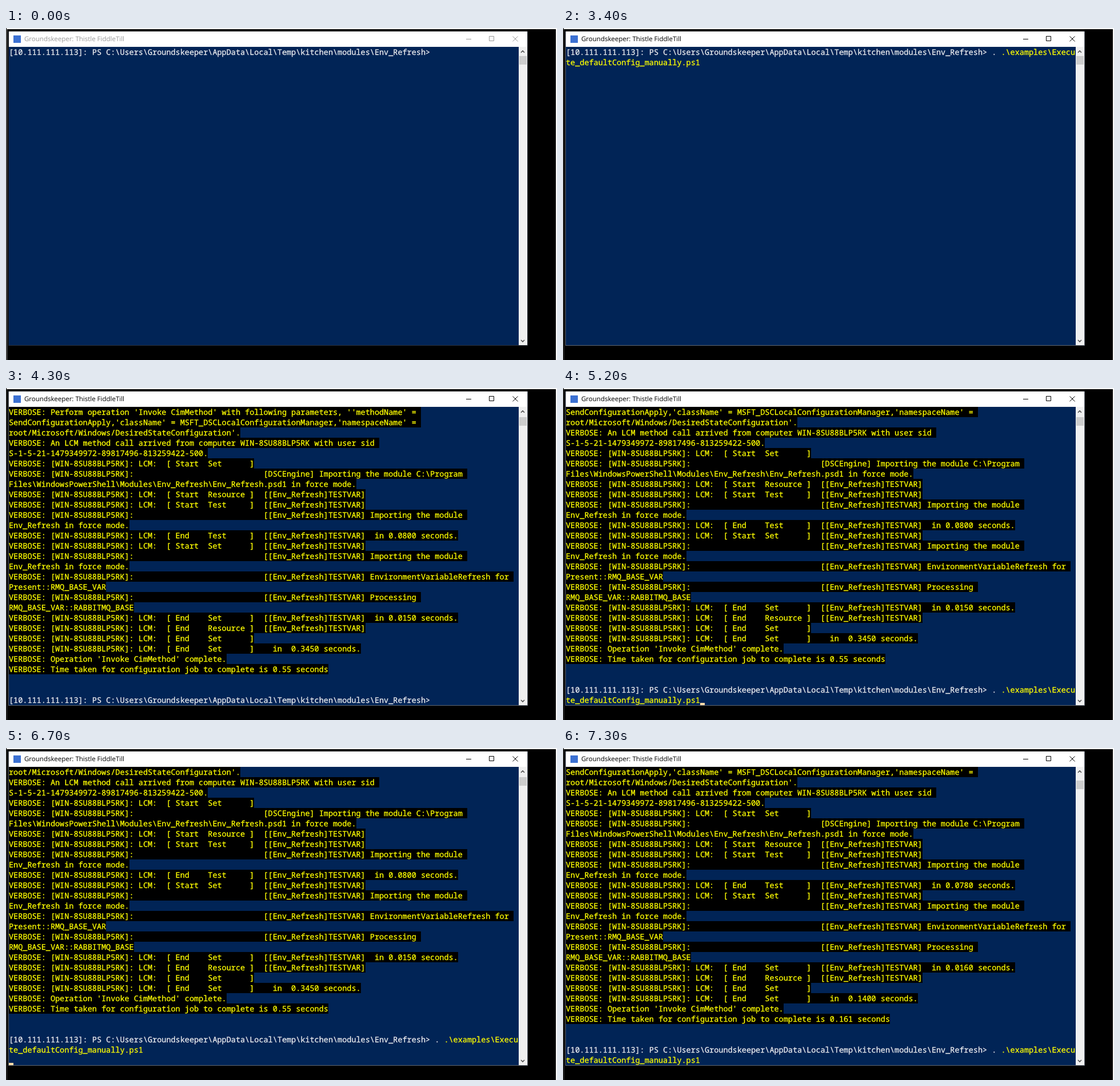
An HTML page for the animation above (8 s loop, 964x581 px).

```html
<!DOCTYPE html>
<html lang="en">
<head>
<meta charset="utf-8">
<title>Console session</title>
<style>
html, body { margin: 0; width: 100%; height: 100%; overflow: hidden; background: #000; }
#stage { position: relative; width: 964px; height: 581px; overflow: hidden; background: #000; --ink: #999; --edge: #2a2f38; --side: #999; }
#stage.active { --ink: #000; --edge: #5f6773; --side: #444; }
#stage div { position: absolute; box-sizing: border-box; }
#top { left: 1px; top: 0; width: 963px; height: 2px; background: #fff; }
#left { left: 1px; top: 0; width: 1px; height: 581px; background: var(--side); }
#right { left: 962px; top: 0; width: 2px; height: 581px; background: #fff; }
#frame { left: 4px; top: 6px; width: 909px; height: 550px; border: 1px solid var(--edge); border-top: 0; background: #fff; }
#icon { left: 13px; top: 13px; width: 13px; height: 13px; background: #3b70d2; }
#title { left: 32px; top: 10px; font: 11.5px/19px "Open Sans", "Noto Sans", sans-serif; color: var(--ink); white-space: pre; text-rendering: geometricPrecision; }
svg { position: absolute; left: 0; top: 0; fill: none; }
#screen { left: 5px; top: 33px; width: 892px; height: 522px; overflow: hidden; background: #012456; color: #eeedf0;
  font: 13.5px/18px "Noto Sans Mono", "DejaVu Sans Mono", monospace; white-space: pre;
  -webkit-text-stroke: 0.3px; text-rendering: geometricPrecision; font-variant-ligatures: none; }
#screen .row { height: 18px; left: 0; }
.yellow, .verbose { color: #ff0; }
.verbose { background: #000; }
#cursor { width: 8px; height: 4px; background: #fedba9; }
#bar { left: 897px; top: 33px; width: 15px; height: 522px; background: #f0f0f0; }
#thumb { left: 898px; width: 13px; height: 15px; background: #cdcdcd; }
</style>
</head>
<body>
<div id="stage">
  <div id="left"></div><div id="top"></div><div id="right"></div>
  <div id="frame"></div>
  <div id="icon"></div>
  <div id="title">Groundskeeper: Thistle FiddleTill</div>
  <div id="screen"></div>
  <div id="bar"></div><div id="thumb"></div>
  <svg width="964" height="581">
    <path stroke="var(--ink)" d="M805 19.5h9M845.5 14.5h8v8h-8zM886.5 14.5l9 9M895.5 14.5l-9 9"/>
    <path stroke="#505050" stroke-width="1.6" d="M901 43l3-3 3 3M901 546l3 3 3-3"/>
  </svg>
</div>
<script>
const CELL = 8.1, ROW = 18, LAST_ROW = 28, LOOP = 8000;
const raw = String.raw;
const home = raw`C:\Users\Groundskeeper\AppData\Local\Temp\kitchen\modules\Env_Refresh`;

// A line is a list of [class, text] runs.
const plain = text => [['', text]];
const verbose = text => [['verbose', text]];
const command = [
  [['', `[10.111.111.113]: PS ${home}> . `], ['yellow', raw`.\examples\Execu`]],
  [['yellow', 'te_defaultConfig_manually.ps1']],
];

function output(testTime, setTime, totalTime, jobTime) {
  const host = 'VERBOSE: [WIN-8SU88BLP5RK]:';
  const res = '[[Env_Refresh]TESTVAR]';
  const lcm = (verb, noun, tail = '') => `${host} LCM:  [ ${verb.padEnd(5)}  ${noun.padEnd(9)}]${tail}`;
  const note = text => host + ' '.repeat(28) + text;
  const importing = [note(`${res} Importing the module `), 'Env_Refresh in force mode.'];
  const listing = [
    '', '', raw`    Directory: ${home}\DefaultConfig`, '', '',
    'Mode                LastWriteTime         Length Name',
    '----                -------------         ------ ----',
    '-a----        5/11/2016   3:42 PM           2128 localhost.mof',
  ];
  const log = [
    "VERBOSE: Perform operation 'Invoke CimMethod' with following parameters, ''methodName' = ",
    "SendConfigurationApply,'className' = MSFT_DSCLocalConfigurationManager,'namespaceName' = ",
    "root/Microsoft/Windows/DesiredStateConfiguration'.",
    'VERBOSE: An LCM method call arrived from computer WIN-8SU88BLP5RK with user sid ',
    'S-1-5-21-1479349972-89817496-813259422-500.',
    lcm('Start', 'Set'),
    note(raw`[DSCEngine] Importing the module C:\Program `),
    raw`Files\WindowsPowerShell\Modules\Env_Refresh\Env_Refresh.psd1 in force mode.`,
    lcm('Start', 'Resource', '  ' + res),
    lcm('Start', 'Test', '  ' + res),
    ...importing,
    lcm('End', 'Test', `  ${res}  in ${testTime} seconds.`),
    lcm('Start', 'Set', '  ' + res),
    ...importing,
    note(`${res} EnvironmentVariableRefresh for `),
    'Present::RMQ_BASE_VAR',
    note(`${res} Processing `),
    'RMQ_BASE_VAR::RABBITMQ_BASE',
    lcm('End', 'Set', `  ${res}  in ${setTime} seconds.`),
    lcm('End', 'Resource', '  ' + res),
    lcm('End', 'Set'),
    lcm('End', 'Set', `    in  ${totalTime} seconds.`),
    "VERBOSE: Operation 'Invoke CimMethod' complete.",
    `VERBOSE: Time taken for configuration job to complete is ${jobTime} seconds`,
  ];
  return [...listing.map(plain), ...log.map(verbose), plain(''), plain('')];
}

const lines = [
  ...command, ...output('0.0800', '0.0150', '0.3450', '0.55'),
  ...command, ...output('0.0780', '0.0160', '0.1400', '0.161'),
  ...command,
];

// [time, cursor row, cursor column, cursor lit]; text is shown up to the cursor.
const steps = [
  [0, 0, 92, 0], [100, 0, 92, 1], [400, 0, 92, 0], [800, 0, 95, 1], [1100, 0, 95, 0],
  [1300, 1, 29, 1], [1500, 1, 29, 0], [1800, 1, 29, 1], [2300, 1, 29, 0], [2800, 1, 29, 1],
  [3300, 2, 0, 1], [3400, 2, 0, 0], [3800, 23, 0, 0], [4200, 36, 0, 0], [4300, 38, 92, 0],
  [5200, 39, 29, 1], [5400, 39, 29, 0], [5700, 39, 29, 1], [6200, 39, 29, 0],
  [6700, 40, 0, 1], [7000, 61, 0, 0], [7100, 74, 0, 0], [7200, 76, 92, 0], [7300, 77, 29, 0],
];

const byId = id => document.getElementById(id);
const stage = byId('stage'), terminal = byId('screen'), thumb = byId('thumb');

function rowElement(line, y, limit) {
  const row = document.createElement('div');
  row.className = 'row';
  row.style.top = y + 'px';
  for (const [kind, text] of line) {
    const run = document.createElement('span');
    run.textContent = text.slice(0, limit);
    limit = Math.max(0, limit - text.length);
    if (kind === 'verbose') row.classList.add(kind);
    else run.className = kind;
    row.append(run);
  }
  return row;
}

function show([time, row, col, lit]) {
  const first = Math.max(0, row - LAST_ROW);
  const rows = lines.slice(first, row + 1).map((line, i) =>
    rowElement(line, i * ROW, first + i === row ? col : Infinity));
  if (lit) {
    const cursor = document.createElement('div');
    cursor.id = 'cursor';
    cursor.style.left = Math.round(col * CELL) + 'px';
    cursor.style.top = (row - first) * ROW + 14 + 'px';
    rows.push(cursor);
  }
  terminal.replaceChildren(...rows);
  thumb.style.top = Math.round(49 + first * 0.163) + 'px';
  stage.classList.toggle('active', time > 0);
}

let current;
function tick() {
  const t = performance.now() % LOOP;
  const step = steps.findLast(s => s[0] <= t);
  if (step !== current) show(current = step);
  requestAnimationFrame(tick);
}
tick();
</script>
</body>
</html>
```
